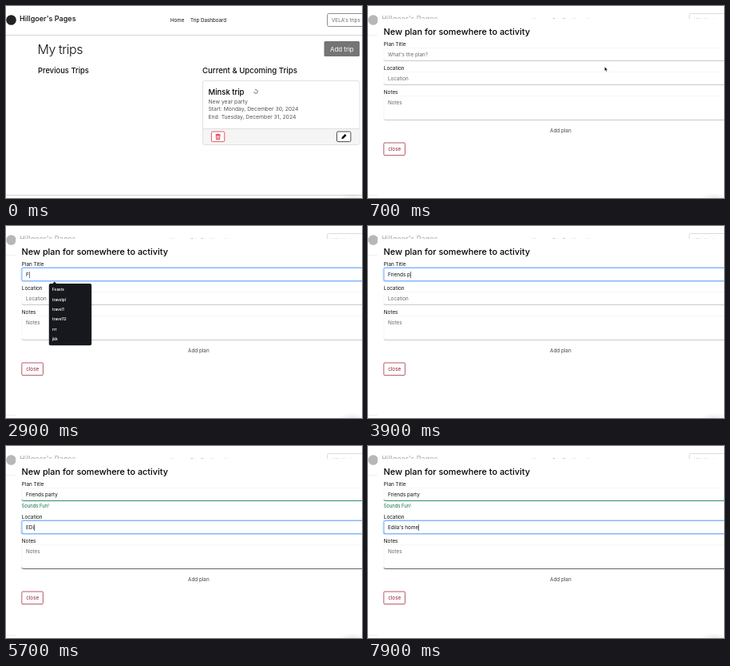
These frames come from a looping animation (446 px wide and 240 px high, 8000 ms). An HTML page:

```html
<!DOCTYPE html>
<html lang="en">
<head>
<meta charset="utf-8">
<title>Trip planner</title>
<style>
  html, body { margin: 0; width: 100%; height: 100%; overflow: hidden; background: #fff; }
  svg { display: block; width: 446px; height: 240px; font: 6.35px Inter, sans-serif; fill: #0c0e10; }
  text { white-space: pre; }
  .mid { font-weight: 500; }
  .soft { fill: #63696f; }
  .box { fill: #fff; stroke: #eceef0; stroke-width: .5; }
  .rule { fill: none; stroke: #c8cacc; stroke-width: 1; }
  .shifted .rule { stroke: #666; }
  .shifted #title .rule { stroke: #2f8f66; }
  .ring { fill: none; stroke: #86b7fe; stroke-width: 1; visibility: hidden; }
  .glow { fill: none; stroke: #c2dbfe; stroke-width: 3; visibility: hidden; }
  .focus .ring, .focus .glow { visibility: visible; }
  .menu { fill: #16181d; }
  .menu text { fill: #f4f4f4; font-size: 4.7px; font-weight: 600; }
</style>
</head>
<body>
<svg viewBox="0 0 446 240">
  <g id="page">
    <path d="M0 36.5H446M0 236.5H446" stroke="#d5d5d5"/>
    <circle cx="6.5" cy="17.5" r="6.3" fill="#222"/>
    <text class="mid" x="17" y="19.3" font-size="9.1">Hillgoer's Pages</text>
    <text x="206" y="19.8" font-size="6.2">Home</text>
    <text x="231" y="19.8" font-size="6.2">Trip Dashboard</text>
    <rect x="402.5" y="9.5" width="60" height="16" rx="2" fill="#fff" stroke="#6c757d" stroke-width=".8"/>
    <text class="soft" x="408" y="20" font-size="6.3">VELA's trips</text>

    <text x="39.5" y="60" font-size="16" font-weight="300" letter-spacing="-.45">My trips</text>
    <rect x="398.5" y="44" width="44.5" height="19" rx="1.5" fill="#757575"/>
    <text x="406" y="56.7" font-size="7.9" fill="#fff">Add trip</text>
    <text class="mid" x="40" y="84" font-size="9.4">Previous Trips</text>
    <text class="mid" x="246" y="84" font-size="9.6">Current &amp; Upcoming Trips</text>

    <rect x="246.5" y="93.5" width="196.5" height="80" rx="2.5" fill="#fff" stroke="#d8d8d8" stroke-width=".8"/>
    <path d="M247 153.5H442.6V171a2 2 0 0 1-2 2H249a2 2 0 0 1-2-2Z" fill="#f5f5f5"/>
    <path d="M247 153.5H442.6" stroke="#d8d8d8" stroke-width=".8"/>
    <text class="mid" x="253.5" y="110.5" font-size="9.5" fill="#000">Minsk trip</text>
    <g font-size="6.8" fill="#555">
      <text x="253.5" y="121.5">New year party</text>
      <text x="253.5" y="131.3">Start: Monday, December 30, 2024</text>
      <text x="253.5" y="141.3">End: Tuesday, December 31, 2024</text>
    </g>
    <rect x="257.4" y="157" width="16.4" height="12.6" rx="1.5" fill="#fff" stroke="#dc3545" stroke-width=".8"/>
    <path d="M262.6 160.8h6M264.6 160.3h2M263.3 161.6l.4 5.2h3.8l.4-5.2zM265.6 162.5v3.4" fill="none" stroke="#dc3545"/>
    <rect x="414.5" y="157" width="17.4" height="12.6" rx="1.5" fill="#fff" stroke="#212529" stroke-width=".8"/>
    <path d="M420.2 166.3l.7-2.4 3.8-3.8 1.8 1.8-3.8 3.8z"/>
  </g>

  <g id="modal">
    <rect x="12" y="16" width="440" height="230" fill="#fff"/>
    <text class="mid" x="19.6" y="36" font-size="10.87" fill="#000">New plan for somewhere to activity</text>
    <g id="title"></g>
    <text id="praise" x="19.6" y="77.4" font-size="5.85" fill="#116b43">Sounds Fun!</text>
    <g id="lower">
      <g id="place"></g>
      <g id="notes"></g>
      <text x="228" y="157.6" fill="#444">Add plan</text>
      <rect x="19.8" y="171" width="26.6" height="15.6" rx="1.2" fill="#fff" stroke="#9c2436" stroke-width=".75"/>
      <text x="25.2" y="181.3" fill="#8f1c2e">close</text>
    </g>
    <g id="menus"></g>
  </g>

  <defs>
    <radialGradient id="shade"><stop stop-color="#000" stop-opacity=".07"/><stop offset="1" stop-opacity="0"/></radialGradient>
  </defs>
  <ellipse cx="434" cy="239" rx="18" ry="5" fill="url(#shade)"/>

  <g id="pointer">
    <path id="busy" d="M-2.3 0a2.3 2.3 0 1 0 2.3-2.3M-1.2-2.6l1.2.3" fill="#fff" stroke="#555" stroke-width=".8"/>
    <path id="arrow" d="M0 0V5.2L1.2 4.1 2 5.9 2.8 5.5 2 3.8H3.6Z" fill="#000" stroke="#fff" stroke-width=".3"/>
    <path id="beam" d="M-1-2.6Q0-2.6 0-2V2Q0 2.6-1 2.6M1-2.6Q0-2.6 0-2M0 2Q0 2.6 1 2.6" fill="none" stroke="#111" stroke-width=".7"/>
  </g>
</svg>
<script>
const LOOP = 8000, STEP = 100, SHIFT = 11;
const CLICK_TITLE = 1000, CLICK_PLACE = 4500;
const $ = id => document.getElementById(id);
const show = (el, on) => { el.style.visibility = on ? 'visible' : 'hidden'; };

function buildField(id, label, hint, top, height) {
  const el = $(id), bottom = top + height;
  const rect = cls => `<rect class="${cls}" x="20" y="${top}" width="440" height="${height}" rx="2"/>`;
  el.innerHTML = `<text x="19.8" y="${top - 2.5}">${label}</text>` +
    rect('glow') + rect('box') +
    `<path class="rule" d="M20 ${bottom - 1.5}q0 1.5 1.5 1.5H460"/>` + rect('ring') +
    `<text class="soft hint" x="25" y="${top + 10.8}">${hint}</text>` +
    `<text class="value" x="25" y="${top + 10.8}"></text>` +
    `<rect class="caret" y="${top + 4.5}" width=".6" height="8" visibility="hidden"/>`;
  const part = name => el.querySelector('.' + name);
  return { el, hint: part('hint'), value: part('value'), caret: part('caret') };
}

function buildMenu(top, items) {
  const el = document.createElementNS('http://www.w3.org/2000/svg', 'g');
  const height = 15.5 + (items.length - 1) * 12.35;
  el.setAttribute('class', 'menu');
  el.innerHTML = `<path d="M58 ${top + .5}l2.8-3 2.8 3z"/>` +
    `<rect x="53.8" y="${top}" width="53.4" height="${height}" rx="2"/>` +
    items.map((s, i) => `<text x="58" y="${top + 9.3 + i * 12.35}">${s}</text>`).join('');
  $('menus').append(el);
  return el;
}

const title = buildField('title', 'Plan Title', "What's the plan?", 52.5, 16);
const place = buildField('place', 'Location', 'Location', 82.5, 16);
buildField('notes', 'Notes', 'Notes', 112.5, 30);

const titleMenu = buildMenu(72, ['Feasts', 'travelpl', 'travel1', 'travel12', 'rrr', 'jkk']);
const placeMenu = buildMenu(113, ['Minsk', 'asdfgh', 'eeeee', '12345678', 'qwerty', 'QQ']);
const matchMenu = buildMenu(113, ['eeeee']);

// Each entry: the time a key lands and the text it leaves.
const titleKeys = [
  [2900, 'F'], [3000, 'Fr'], [3200, 'Fri'], [3400, 'Frie'], [3500, 'Frien'], [3600, 'Friend'],
  [3700, 'Friends'], [3900, 'Friends p'], [4000, 'Friends pa'], [4100, 'Friends par'],
  [4200, 'Friends part'], [4300, 'Friends party']];
const placeKeys = [
  [5400, 'E'], [5500, 'ED'], [5700, 'EDi'], [5900, 'ED'], [6100, 'E'], [6300, 'Ed'], [6400, 'Edi'],
  [6500, 'Edil'], [6800, 'Edila'], [6900, "Edila'"], [7100, "Edila's"], [7200, "Edila's h"],
  [7300, "Edila's ho"], [7500, "Edila's hom"], [7900, "Edila's home"]];

// Pointer legs: from, to, shape, start point, end point.
const legs = [
  [0, 100, 'busy', 313, 107, 313, 107],
  [100, 700, 'arrow', 313, 105, 296.5, 76],
  [700, 1000, 'arrow', 296.5, 76, 200, 66],
  [1000, 1400, 'beam', 200, 67, 200, 67],
  [1400, 1700, 'beam', 200, 67, 147.5, 67.5],
  [1700, 2900, 'beam', 147.5, 67.5, 147.5, 67.5],
  [4400, 4500, 'beam', 115, 88, 115, 88],
  [4500, 5400, 'arrow', 114.5, 85.5, 114.5, 85.5],
  [7200, 7700, 'beam', 114, 94, 100, 107]];

function drawField(field, keys, t, focused, since) {
  const last = keys.filter(k => k[0] <= t).pop();
  const text = last ? last[1] : '';
  field.value.textContent = text;
  show(field.hint, !text);
  field.el.classList.toggle('focus', focused);
  const idle = t - Math.max(since, last ? last[0] : 0);
  show(field.caret, focused && Math.floor(idle / 200) % 2 === 0);
  field.caret.setAttribute('x', 25 + (text ? field.value.getComputedTextLength() + .2 : 0));
}

function drawPointer(t) {
  const leg = legs.find(l => t >= l[0] && t < l[1]);
  for (const id of ['busy', 'arrow', 'beam']) show($(id), leg && leg[2] === id);
  if (!leg) return;
  const [a, b, , x0, y0, x1, y1] = leg, k = (t - a) / (b - a);
  $('pointer').setAttribute('transform', `translate(${x0 + (x1 - x0) * k} ${y0 + (y1 - y0) * k})`);
}

function render(t) {
  const p = Math.min(1, Math.max(0, (t - 50) / 400)), k = 1 - (1 - p) ** 2;
  $('page').style.opacity = 1 - .68 * k;
  $('modal').style.opacity = k;
  $('modal').setAttribute('transform', `translate(0 ${-20 * (1 - k)})`);

  const moved = t >= CLICK_PLACE;
  $('modal').classList.toggle('shifted', moved);
  $('lower').setAttribute('transform', `translate(0 ${moved ? SHIFT : 0})`);
  show($('praise'), moved);

  drawField(title, titleKeys, t, t >= CLICK_TITLE && !moved, 1100);
  drawField(place, placeKeys, t, moved, 4600);
  show(titleMenu, t >= 1100 && t < 3000);
  show(placeMenu, t >= 4600 && t < 5400);
  show(matchMenu, t >= 6100 && t < 6400);
  drawPointer(t);
}

let start;
function tick(now) {
  start ??= now;
  render(Math.floor(((now - start) % LOOP) / STEP) * STEP);
  requestAnimationFrame(tick);
}
render(0);
requestAnimationFrame(tick);
</script>
</body>
</html>
```
